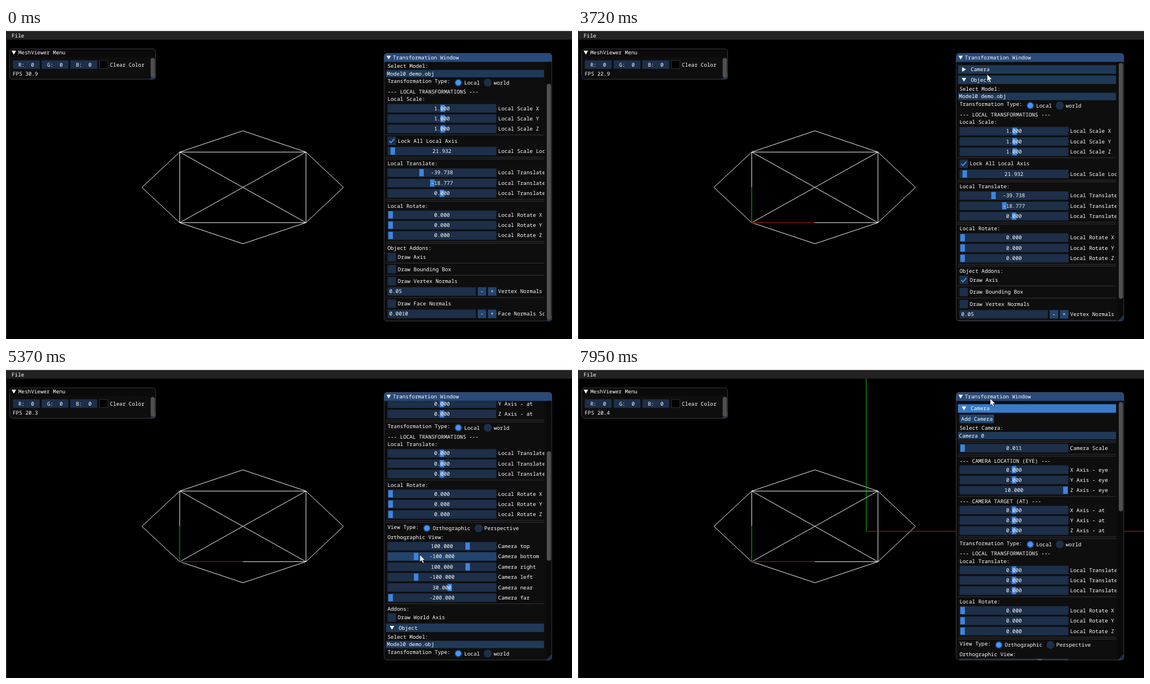
An HTML page that plays this animation: 1008 by 555 pixels, repeating every 7.99 s.

```html
<!DOCTYPE html>
<html lang="en">
<head>
<meta charset="utf-8">
<title>Mesh viewer</title>
<style>
html, body { margin: 0; width: 100%; height: 100%; overflow: hidden; background: #000; }
svg { display: block; width: 1008px; height: 555px; }
text { font: 9.33px "Noto Sans Mono", "DejaVu Sans Mono", monospace; fill: #fff; white-space: pre; text-rendering: geometricPrecision; }
.mesh { fill: none; stroke: #f4f4f4; }
</style>
</head>
<body>
<svg id="stage" viewBox="0 0 1008 555">
  <defs>
    <clipPath id="view"><rect x="674" y="60.6" width="285" height="462.4"/></clipPath>
  </defs>
  <rect width="1008" height="555"/>
  <rect y="20" width="1" height="535" fill="#3a3a3a"/>
  <rect width="1008" height="5.6" fill="#fff"/>
  <rect y="5.6" width="1008" height="15.2" fill="#222"/>
  <text x="10" y="17">File</text>

  <path class="mesh" d="M242 284.4L309.4 221.4L422 183.5L534.2 221.4L601 284.4L534.2 347.4L422 385L309.4 347.4ZM309.4 221.4H534.2V347.4H309.4ZL534.2 347.4M534.2 221.4L309.4 347.4"/>
  <g id="modelAxis" class="mesh">
    <path d="M309.4 284V347M309.4 284V347" stroke="#000" stroke-width="2"/>
    <path d="M310 347.4H422" stroke="#000" stroke-width="2"/>
    <path d="M309.4 284V347" stroke="#0cb40c"/>
    <path d="M310 347.4H422" stroke="#a81010"/>
  </g>
  <g id="worldAxis" class="mesh">
    <path d="M513.3 21V293" stroke="#10c810"/>
    <path d="M513 293.2H1008" stroke="#e01212"/>
  </g>

  <g id="menu"></g>
  <g id="panel"></g>
  <g id="content" clip-path="url(#view)"><g id="camera"></g><g id="object"></g></g>
  <g id="chrome"></g>
  <path id="cursor" d="M0 0V13L3 10.3L5.1 15L7.4 14L5.3 9.4H9.4Z" fill="#fff" stroke="#000" stroke-width=".7"/>
</svg>
<script>
const NS = "http://www.w3.org/2000/svg";
const FRAME = "#1d2f49", FRAME_HOT = "#23456d", BUTTON = "#23456d", HEADER = "#1f3958",
      HEADER_HOT = "#387bcb", GRAB = "#3d85e0", MARK = "#4296fa", LINE = "#3f3f47", BORDER = "rgba(110,110,128,.5)";
const LEFT = 679.4, LABEL = 876.6, CHAR = 5.6;
const $ = id => document.getElementById(id);
const hoverables = [];
let root;

function add(tag, attrs) {
  const el = document.createElementNS(NS, tag);
  for (const k in attrs) el.setAttribute(k, attrs[k]);
  root.appendChild(el);
  return el;
}
const rect = (x, y, width, height, fill, more) => add("rect", { x, y, width, height, fill, ...more });
const path = (d, more) => add("path", { d, fill: "#fff", ...more });
const outline = (x, y, w, h) => rect(x, y, w, h, "none", { rx: 5.6, stroke: BORDER });

function label(x, y, str) {
  const el = add("text", { x, y: y + 3.3 });
  el.textContent = str;
  return el;
}
const centred = (x, y, str) => label(x - str.length * CHAR / 2, y, str);

// A box of one text row, centred on y, that reacts to the pointer
function box(x, y, w, h, fill, hot, reach = w) {
  const el = rect(x, y - h / 2, w, h, fill);
  hoverables.push({ el, group: root, x, y, w: reach, h, fill, hot });
  return el;
}
function slider(y, value, grab, name) {
  box(LEFT, y, 194, 15.2, FRAME, FRAME_HOT);
  rect(grab - 4, y - 6.4, 8, 12.8, GRAB);
  centred(776.4, y, value);
  label(LABEL, y, name);
}
const sliders = (y, rows) => rows.forEach((r, i) => slider(y + i * 18.4, ...r));
const axes = (name, value, grab) => [..."XYZ"].map(a => [value, grab, `${name} ${a}`]);
const rule = (...ys) => ys.forEach(y => rect(676.6, y - .4, 281.6, .8, LINE));

function check(y, name, on) {
  box(LEFT, y, 15.2, 15.2, FRAME, FRAME_HOT, 120);
  const mark = path(`M682.6 ${y + .3}L685.6 ${y + 3.3}L691.6 ${y - 3.6}`,
    { fill: "none", stroke: MARK, "stroke-width": 1.8 });
  if (!on) mark.style.display = "none";
  label(697.8, y, name);
  return mark;
}
function radio(x, y, name, on) {
  add("circle", { cx: x, cy: y, r: 7.1, fill: FRAME });
  if (on) add("circle", { cx: x, cy: y, r: 5.1, fill: MARK });
  label(x + 10.4, y, name);
}
function transformType(y) {
  label(LEFT, y, "Transformation Type:");
  radio(805.5, y + 2.4, "Local", true);
  radio(858, y + 2.4, "world");
  label(LEFT, y + 18.4, "--- LOCAL TRANSFORMATIONS ---");
}
function list(y, str) {
  box(676.6, y, 281.6, 13.2, HEADER, HEADER_HOT);
  label(678.6, y, str);
}
function input(y, value, name) {
  rect(LEFT, y - 7.6, 157.4, 15.2, FRAME);
  label(682.6, y, value);
  [[840, "-"], [858.2, "+"]].forEach(([x, s]) => {
    rect(x, y - 7.6, 15.2, 15.2, BUTTON);
    centred(x + 7.6, y, s);
  });
  label(LABEL, y, name);
}
const down = (x, y) => `M${x - 4} ${y - 3.4}H${x + 4}L${x} ${y + 3.4}Z`;
const right = (x, y) => `M${x - 3.2} ${y - 4}V${y + 4}L${x + 3.8} ${y}Z`;
function header(y, name) {
  box(676.6, y, 281.6, 15.2, HEADER, HEADER_HOT);
  label(699.4, y, name);
  return path(down(687.4, y));
}
const grip = (x, y) => path(`M${x} ${y - 11}V${y - 4}Q${x} ${y} ${x - 4} ${y}H${x - 11}Z`, { fill: "#1b304a" });

// Small menu window
root = $("menu");
rect(6.4, 37.2, 260, 54.2, "#0e0e0e", { rx: 5.6 });
path("M6.4 51.8V43Q6.4 37.2 12 37.2H261Q266.4 37.2 266.4 43V51.8Z", { fill: "#0a0a0a" });
path(down(14, 44));
label(22, 44, "MeshViewer Menu");
["R:  0", "G:  0", "B:  0"].forEach((s, i) => {
  rect(12.2 + i * 51.2, 57.6, 47.8, 15.2, FRAME);
  centred(36 + i * 51.2, 65.3, s);
});
rect(166.5, 58, 15, 14.6, "#000", { stroke: BORDER, "stroke-width": .8 });
label(185, 65.3, "Clear Color");
const fps = label(12, 82, "");
grip(266.4, 91.4);
rect(257.6, 53.6, 7.6, 35, "#4f4f4f", { rx: 3.6 });
outline(6.4, 37.2, 260, 54.2);

// Transformation window
root = $("panel");
rect(673.4, 45.2, 298.6, 477.8, "#0e0e0e", { rx: 5.6 });
path("M673.4 60.4V51Q673.4 45.2 679 45.2H966.5Q972 45.2 972 51V60.4Z", { fill: "#294a7a" });
path(down(681.5, 52.8));
label(689, 52.8, "Transformation Window");
rect(961.6, 60.6, 10, 460, "#0a0a0a");

root = $("camera");
const cameraArrow = header(74, "Camera");
root = add("g", {});
const cameraBody = root;
rect(LEFT, 85, 61.6, 15.2, BUTTON);
label(682.6, 92.6, "Add Camera");
label(LEFT, 108.6, "Select Camera:");
list(122.4, "Camera 0");
rule(131.8, 134.8);
slider(144.8, "0.011", 685, "Camera Scale");
rule(155.9, 159.1);
label(LEFT, 167.3, "--- CAMERA LOCATION (EYE) ---");
sliders(183.2, [["0.000", 776.4, "X Axis - eye"], ["0.000", 776.4, "Y Axis - eye"], ["10.000", 868, "Z Axis - eye"]]);
rule(231);
label(LEFT, 239.4, "--- CAMERA TARGET (AT) ---");
sliders(255.2, ["X", "Y", "Z"].map(a => ["0.000", 776.4, a + " Axis - at"]));
rule(303, 306.2);
transformType(314.2);
label(LEFT, 346.4, "Local Translate:");
sliders(362.3, axes("Local Translate", "0.000", 776.4));
rule(410.1);
label(LEFT, 418.5, "Local Rotate:");
sliders(434.5, axes("Local Rotate", "0.000", 685));
rule(482.2, 485.4);
label(LEFT, 493.6, "View Type:");
radio(749.5, 496, "Orthographic", true);
radio(841.4, 496, "Perspective");
label(LEFT, 512.2, "Orthographic View:");
sliders(528, [["100.000", 822.2, "Camera top"], ["-100.000", 730.4, "Camera bottom"],
  ["100.000", 822.2, "Camera right"], ["-100.000", 730.4, "Camera left"],
  ["30.000", 790.2, "Camera near"], ["-200.000", 685, "Camera far"]]);
rule(630.6);
label(LEFT, 639.5, "Addons:");
const worldMark = check(655.3, "Draw World Axis");

// Placed relative to its own header
root = $("object");
header(0, "Object");
label(LEFT, 16, "Select Model:");
list(29.8, "Model0 demo.obj");
transformType(43.6);
label(LEFT, 75.6, "Local Scale:");
sliders(91.7, axes("Local Scale", "1.000", 777.6));
rule(139.2);
check(149.8, "Lock All Local Axis", true);
slider(168, "21.932", 688.8, "Local Scale Lock");
rule(179, 182.2);
label(LEFT, 190.6, "Local Translate:");
sliders(206.6, [["-39.738", 740, "Local Translate X"], ["-18.777", 759.2, "Local Translate Y"], ["0.000", 776.4, "Local Translate Z"]]);
rule(254.3, 257.5);
label(LEFT, 265.7, "Local Rotate:");
sliders(281.8, axes("Local Rotate", "0.000", 685));
rule(329.4, 332.6);
label(LEFT, 341.2, "Object Addons:");
const axisMark = check(357.2, "Draw Axis");
rule(367.8);
check(378.7, "Draw Bounding Box");
rule(389.5);
check(400.2, "Draw Vertex Normals");
input(418.5, "0.05", "Vertex Normals Scale");
rule(429.4);
check(440.2, "Draw Face Normals");
input(458.5, "0.0010", "Face Normals Scale");

root = $("chrome");
grip(972, 523);
const thumb = rect(963, 62.4, 7.6, 100, "#4f4f4f", { rx: 3.6 });
outline(673.4, 45.2, 298.6, 477.8);

// Timeline
const LOOP = 7990, PICK_AXIS = 2040, SCROLL_TOP = 3720, OPEN = 4760, PICK_WORLD = 6480, TICK = 52.06, LAG = 250;
const bursts = [[160, 880, 12], [970, 1700, 12], [1770, 2430, 10], [2690, 3440, 12], [3520, 3520, 1],
  [3660, 4440, 11], [4490, 5230, 11], [5310, 6100, 12], [6160, 6950, 13], [7020, 7800, 13], [7870, 7950, 2]];
const pointer = [[160, 987, 462], [420, 905, 491], [880, 776, 407], [1250, 738, 396], [1640, 704, 372],
  [1700, 691, 408], [2690, 691, 408], [2780, 720, 352], [3030, 750, 227], [3300, 738, 130], [3440, 729, 86],
  [3520, 728, 83], [3660, 728, 83], [4360, 732, 77], [4770, 732, 77], [4940, 738, 200], [5100, 737, 335],
  [5700, 737, 335], [5860, 722, 358], [6030, 704, 343], [7020, 704, 343], [7320, 728, 240],
  [7560, 735, 122], [7700, 735, 74], [7800, 735, 64], [7950, 734, 56]];
const rate = [[0, 30.9], [880, 28.9], [1900, 26.5], [3030, 24.1], [4630, 21.5], [5370, 20.3], [6100, 19.8],
  [6300, 19.7], [6950, 19.6], [7800, 20.2], [7950, 20.4]];
const ticksDown = [4990, 5060, 5140, 5210, 5760, 5900];
const ticksUp = [7090, 7170, 7250, 7330, 7410, 7490];

function at(keys, t, i = 1) {
  const n = keys.findIndex(k => k[0] > t);
  if (n < 0) return keys[keys.length - 1][i];
  if (n === 0) return keys[0][i];
  const a = keys[n - 1], b = keys[n];
  return a[i] + (b[i] - a[i]) * (t - a[0]) / (b[0] - a[0]);
}
function held(t) {
  let last = 0;
  for (const [a, b, n] of bursts) {
    if (t + 20 < a) break;
    const d = (b - a) / (n - 1) || 1;
    last = a + Math.min(n - 1, Math.floor((t + 20 - a) / d)) * d;
  }
  return last;
}
const passed = (times, t) => times.filter(k => k <= t).length;
const show = (el, on) => { el.style.display = on ? "" : "none"; };

function draw(now) {
  const t = held(now), open = t >= OPEN;
  const scroll = open ? TICK * (passed(ticksDown, t) - passed(ticksUp, t)) : t < SCROLL_TOP ? 40.8 : 0;
  const objectY = open ? 673.6 : 92.4, total = open ? 1085 : 503.2;

  $("camera").setAttribute("transform", `translate(0 ${-scroll})`);
  $("object").setAttribute("transform", `translate(0 ${objectY - scroll})`);
  show(cameraBody, open);
  cameraArrow.setAttribute("d", open ? down(687.4, 74) : right(687.4, 74));
  thumb.setAttribute("y", 62.4 + scroll / total * 458);
  thumb.setAttribute("height", 462.4 / total * 458);

  show(axisMark, t >= PICK_AXIS);
  show($("modelAxis"), t >= PICK_AXIS);
  show(worldMark, t >= PICK_WORLD);
  show($("worldAxis"), t >= PICK_WORLD);
  fps.textContent = "FPS " + at(rate, t).toFixed(1);

  show($("cursor"), t >= 160);
  $("cursor").setAttribute("transform", `translate(${at(pointer, t)} ${at(pointer, t, 2)})`);

  // Widgets react later than the pointer
  const hx = at(pointer, t - LAG), hy = at(pointer, t - LAG, 2);
  for (const h of hoverables) {
    const y = h.y - scroll + (h.group.id === "object" ? objectY : 0);
    const live = hy > 60 && (open || h.group !== cameraBody);
    const hit = live && hx >= h.x && hx <= h.x + h.w && Math.abs(hy - y) <= h.h / 2;
    h.el.setAttribute("fill", hit ? h.hot : h.fill);
  }
}

const start = performance.now();
function loop() {
  draw((performance.now() - start) % LOOP);
  requestAnimationFrame(loop);
}
loop();
</script>
</body>
</html>
```
